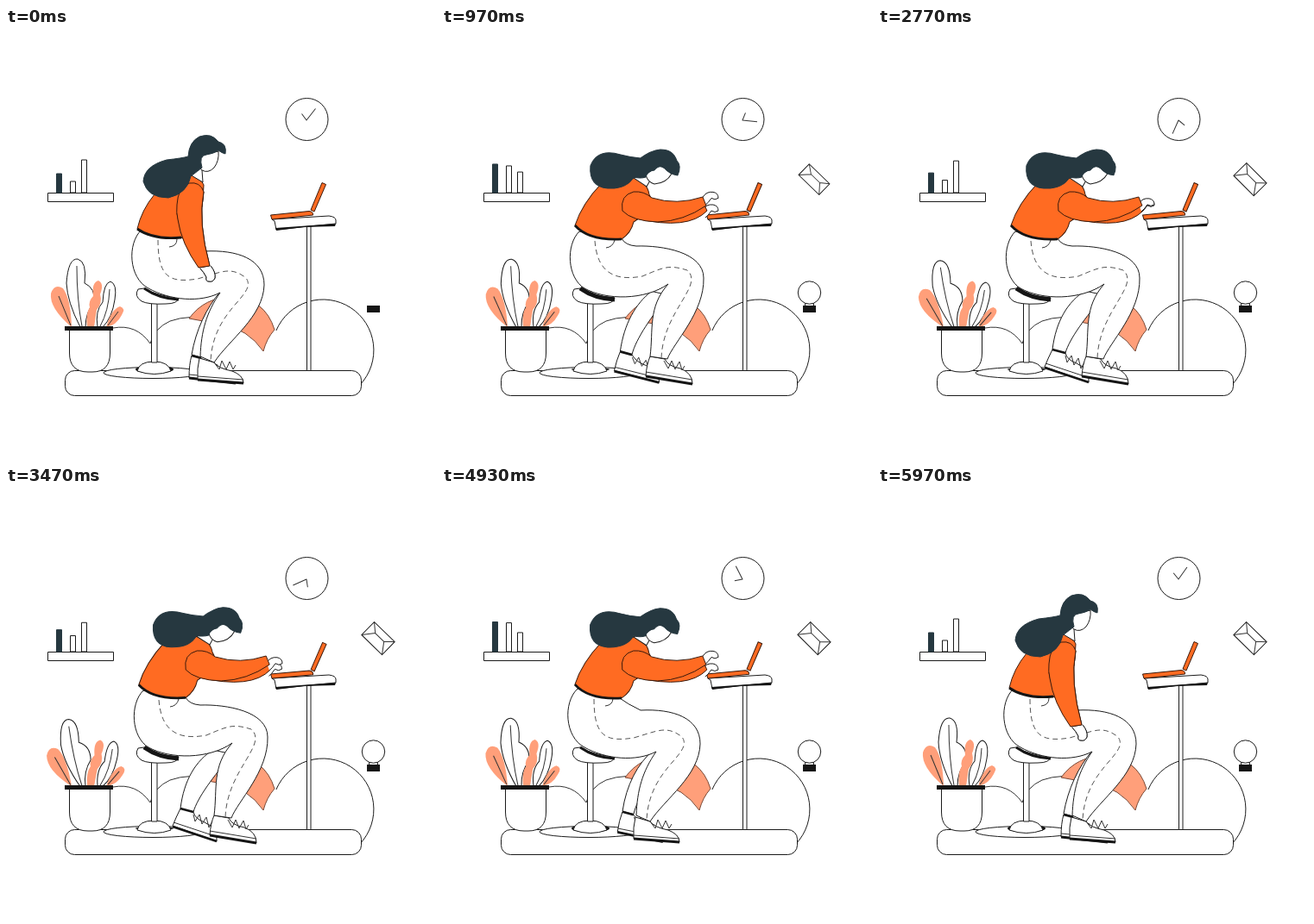
An HTML page for the animation above (6010 ms loop, 498x500 px).

```html
<!DOCTYPE html>
<html lang="en">
<head>
<meta charset="utf-8">
<title>Desk work</title>
<style>
html, body { margin: 0; width: 100%; height: 100%; overflow: hidden; background: #fff; }
svg { display: block; width: 100vw; height: 100vh; }
path, rect, circle, ellipse { fill: #fff; stroke: #1b1b1b; stroke-width: 1; stroke-linejoin: round; }
.line { fill: none; stroke: #333; }
.seam { fill: none; stroke: #555; stroke-dasharray: 6 4; }
.orange { fill: #ff6b22; stroke: #3a1a0c; }
.peach { fill: #ff9f7a; stroke: none; }
.edge { stroke: #7a4a38; }
.dark { fill: #263840; stroke: #263840; }
.black { fill: #151515; stroke: none; }
.thick { fill: none; stroke: #151515; stroke-width: 2.8; }
</style>
</head>
<body>
<svg viewBox="0 0 498 500">
  <!-- background -->
  <path d="M312.9 351A58.8 58.8 0 1 1 410 414"/>
  <path class="line" d="M124 348Q151 343 167 366Q172 348 190 340Q201 336 214 335.5"/>
  <path class="peach edge" d="M212 337Q230 312 262 312Q300 314 311 350Q302 360 298 375Q280 349 250 344Z"/>

  <circle cx="348.5" cy="106" r="24.5"/>
  <g id="hands"><path class="line" d="M342.5 99.5L348 107L358.5 93.5"/></g>

  <rect x="48.5" y="191.5" width="76" height="10"/>
  <rect id="bar0" class="dark" x="58.5" width="6"/>
  <rect id="bar1" x="74.5" width="6"/>
  <rect id="bar2" x="87.5" width="6"/>

  <g id="mail">
    <rect x="-16.5" y="-10.5" width="33" height="21"/>
    <path class="line" d="M-16.5 -10.5L-6.6 -2L-16.5 10.5M16.5 -10.5L7.4 -2L16.5 10.5M-6.6 -2H7.4"/>
  </g>
  <g id="bulb">
    <path d="M420.5 322V319H430.5V322"/>
    <circle cx="425.5" cy="307" r="13.2"/>
  </g>
  <rect class="black" x="418" y="322" width="15" height="8"/>

  <!-- floor and furniture -->
  <rect x="68.5" y="397.5" width="343" height="29" rx="11"/>
  <rect x="348.5" y="228" width="4.5" height="169.5"/>
  <path d="M308 222L374 218Q382 219 382 223V227Q350 230 313 234L311 224Z"/>
  <path class="black" d="M312 232L382 227L381 230L345 231L313 235Z"/>
  <g id="laptop">
    <path class="orange" d="M306.5 217L351 212.5Q356 213 355.5 217L308 222Z"/>
    <path class="orange" d="M353 211L366 179.5L370.5 181.5L357 213Z"/>
  </g>
  <ellipse cx="170" cy="400" rx="57" ry="6.5"/>

  <!-- plant -->
  <g id="leaf0">
    <path class="peach" d="M76 347Q50 325 52 308Q56 296 66 302Q75 314 76 347Z"/>
    <path class="line" d="M61 311Q68 328 75 345"/>
  </g>
  <g id="leaf1">
    <path d="M86 347Q71 318 70 296Q72 267 83 268Q94 271 91 296Q104 302 102 318Q92 330 92 347Z"/>
    <path class="line" d="M82 276Q82 315 88 346"/>
  </g>
  <g id="leaf3">
    <path d="M106 347Q103 328 112 318Q113 296 121 294Q129 297 126 315Q123 336 112 347Z"/>
    <path class="line" d="M120 303Q119 328 109 346"/>
  </g>
  <g id="leaf2"><path class="peach" d="M94 347Q92 331 97 324Q95 317 101 311Q99 295 107 293Q114 296 109 309Q112 319 105 327L102 347Z"/></g>
  <g id="leaf4">
    <path class="peach" d="M116 347Q122 326 132 323Q139 325 134 333Q128 345 116 347Z"/>
    <path class="line" d="M130 329L118 345"/>
  </g>
  <path d="M73.5 350V377Q73.5 399 95 399H100Q120.5 399 120.5 377V350Z"/>
  <rect class="black" x="68" y="346" width="56" height="5"/>

  <!-- stool -->
  <ellipse id="shade" class="black" cx="172" cy="396" rx="22"/>
  <path d="M152 398Q154 387 171.5 387Q188 387 191 398Q172 405 152 398Z"/>
  <rect x="168.5" y="319" width="6.5" height="69"/>
  <path d="M153 303Q148 311 157 317Q165 321 185 320Q199 320 200 313Q175 311 160 302Z"/>
  <path id="seatEdge" class="thick" d="M160 302Q177 314 200 315"/>

  <g id="person"></g>
</svg>
<script>
const LOOP = 6010, TAU = Math.PI * 2;
const $ = id => document.getElementById(id);

// Each part: class, driver, resting path, working path.
const handPaths = [
  "M237 276Q243 283 242 290Q240 295 235 294Q231 294 232 289Q229 283 225 279",
  "M302 196Q306 189 314 190Q320 191 320 197Q316 200 312 197Q308 203 305 205"
];
const parts = {
  rearShoe: ["", "rear",
    "M215 380L226 383Q235 392 250 397Q266 403 266 411L212 406Q212 390 215 380Z",
    "M202 373L217 377Q219 385 230 389Q246 396 244 411L193 393Q197 383 202 373Z"],
  rearSole: ["thick", "rear", "M212 406L266 412", "M193 394L244 411"],
  rearTrim: ["line", "rear", "M212 402L266 407", "M194 389L245 406"],
  rearLace: ["line", "rear",
    "M227 386L232 393L235 386L240 395L244 390L248 398L251 394",
    "M217 380L219 388L224 380L227 391L232 383L235 395L239 388"],
  rearLeg: ["", "rear",
    "M248 306C232 325 220 350 215 379L226 382C230 360 250 330 262 310Z",
    "M240 305C220 317 206 340 202 373L217 377C222 360 240 336 262 310Z"],
  rearCuff: ["thick", "rear", "M215 380L226 383", "M202 373L217 377"],
  shoe: ["", "front",
    "M224 383L241 388Q246 395 262 398Q275 403 275 412L222 408Q221 395 224 383Z",
    "M241 381L258 384Q261 392 276 395Q290 400 290 413L236 404Q237 390 241 381Z"],
  sole: ["thick", "front", "M222 408L275 412", "M236 404L290 413"],
  trim: ["line", "front", "M222 404L275 408", "M236 399L290 408"],
  lace: ["line", "front",
    "M241 388L247 396L250 386L255 396L259 387L263 396L266 391",
    "M257 386L262 395L266 386L270 396L275 387L278 397L281 392"],
  leg: ["", "front",
    "M157 234C140 250 142 290 165 302C190 316 225 319 248 307C232 330 226 352 225 381L241 388C258 362 298 335 299 298C299 268 268 257 230 259Q215 252 203 243Z",
    "M159 236C143 252 145 290 165 302C190 316 235 316 262 297C238 324 245 350 241 381L261 384C268 365 304 330 303 290C303 260 255 252 225 253Q212 252 208 244Z"],
  seam: ["seam", "front",
    "M176 246C176 290 190 296 222 291C250 283 260 276 278 290C292 310 240 325 237 386",
    "M177 247C180 288 205 293 232 288C256 278 262 274 284 281C304 299 256 328 254 383"],
  pocket: ["line", "front", "M189 254Q198 253 198 245", "M190 255Q198 254 200 246"],
  shirt: ["orange", "torso",
    "M172 193Q157 211 152 233Q170 246 203 243Q215 241 220 240Q228 215 229 182Q224 171 213 169Q195 180 172 193Z",
    "M185 180Q162 204 154 229Q170 247 208 245Q219 238 222 225Q250 208 240 193Q238 179 222 174Q205 186 185 180Z"],
  hem: ["thick", "torso", "M152 233Q170 246 203 243", "M154 229Q170 247 208 245"],
  farHand: ["", "torso", ...handPaths],
  farArm: ["orange", "torso",
    "M198 215Q222 210 229 190Q222 225 236 276L224 278Q203 250 198 215Z",
    "M225 221Q240 208 268 214Q290 212 303 203L307 212Q285 235 225 221Z"],
  hand: ["", "torso", ...handPaths],
  arm: ["orange", "torso",
    "M198 205Q199 185 212 180Q225 178 229 190Q222 225 236 276L223 278Q203 250 199 222Q197 214 198 205Z",
    "M209 212Q206 194 222 190Q234 189 243 197Q272 206 302 196L306 206Q280 224 250 225Q220 224 209 212Z"],
  neck: ["", "torso", "M219 157L213 170L228 179L227 165Z", "M238 168L222 174L237 184L241 177Z"],
  face: ["", "torso",
    "M224 148Q220 160 227 165Q234 169 241 162Q247 154 246 143Z",
    "M236 170Q238 179 246 181Q260 180 266 169Q258 160 250 160Z"],
  hair: ["dark", "torso",
    "M254 146Q256 134 246 132Q238 121 224 126Q212 132 211 149Q204 151 186 153Q160 160 159 178Q164 197 188 197Q210 192 214 172Q222 166 227 162Q223 148 232 147Q240 146 246 142Q250 145 254 146Z",
    "M273 171Q278 160 272 154Q268 141 253 141Q242 142 230 151Q218 150 207 147Q180 139 172 160Q170 184 192 186Q214 187 222 173Q230 175 236 173Q238 166 246 165Q252 158 258 163Q264 170 273 171Z"]
};

const nums = s => s.match(/[\d.]+/g).map(Number);
for (const part of Object.values(parts)) {
  const el = document.createElementNS("http://www.w3.org/2000/svg", "path");
  el.setAttribute("class", part[0]);
  $("person").append(el);
  part.el = el;
  part.words = part[2].split(/[\d.]+/);
  part.from = nums(part[2]);
  part.to = nums(part[3]);
}

const mix = (a, b, k) => a + (b - a) * k;
const wave = (t, n) => (1 - Math.cos(TAU * n * t / LOOP)) / 2;
const ease = (t, a, b) => {
  const x = Math.min(1, Math.max(0, (t - a) / (b - a)));
  return x * x * (3 - 2 * x);
};
const set = (id, name, value) => $(id).setAttribute(name, value);
const move = (id, value) => set(id, "transform", value);
const shift = (name, value) => parts[name].el.setAttribute("transform", value);

const leaves = [[-8, 78], [-8, 90], [2.5, 98], [4.5, 109], [4, 117]];
const bars = [[169, 153.7], [178, 153], [153, 172.5]];

function render(t) {
  const pose = {
    torso: ease(t, 50, 850) - ease(t, 5000, 5850),
    front: ease(t, 100, 900) - ease(t, 4000, 4850),
    rear: ease(t, 150, 1500) - ease(t, 4300, 5500)
  };
  for (const p of Object.values(parts)) {
    const k = pose[p[1]];
    const d = p.words.map((w, i) => w + (i < p.from.length ? mix(p.from[i], p.to[i], k).toFixed(2) : ""));
    p.el.setAttribute("d", d.join(""));
  }

  // typing
  const work = pose.torso ** 2;
  const bob = work * (1 - Math.cos(TAU * (20 * t / LOOP - .29))) / 2;
  const near = (1 - Math.cos(TAU * (18 * t / LOOP + .16))) / 2;
  const far = Math.max(0, Math.cos(TAU * (15 * t / LOOP - .86))) ** 2;
  for (const name of ["shirt", "hem", "neck", "face", "hair"]) shift(name, `rotate(${-2 * bob} 180 242)`);
  shift("arm", `translate(${-1.5 * bob} 0)`);
  shift("farArm", `translate(${-1.5 * bob} 0)`);
  shift("hand", `translate(0 ${8 * near * work})`);
  shift("farHand", `translate(${-bob} ${(15 - 7 * far) * work})`);
  move("laptop", `rotate(${1.6 * bob} 310 221)`);

  // stool under load
  set("shade", "ry", mix(4.5, 2, pose.front));
  $("seatEdge").style.strokeWidth = mix(3, 5, pose.front);

  // surroundings
  move("hands", `rotate(${360 * t / LOOP} 348 107)`);
  bars.forEach(([a, b], i) => {
    const y = mix(a, b, wave(t, 2));
    set("bar" + i, "y", y);
    set("bar" + i, "height", 191 - y);
  });
  leaves.forEach(([deg, x], i) => move("leaf" + i, `rotate(${deg * wave(t, 1)} ${x} 347)`));
  const pop = ease(t, 0, 450);
  const tilt = 44.6 + Math.sin(TAU * 5 * t / LOOP) * .6;
  move("mail", `translate(431 175.6) rotate(${tilt}) scale(${pop} ${ease(t, 0, 1300)})`);
  move("bulb", `translate(425.5 322) scale(${pop}) translate(-425.5 -322)`);
}

const start = performance.now();
function tick() {
  render((performance.now() - start) % LOOP);
  requestAnimationFrame(tick);
}
render(0);
requestAnimationFrame(tick);
</script>
</body>
</html>
```
